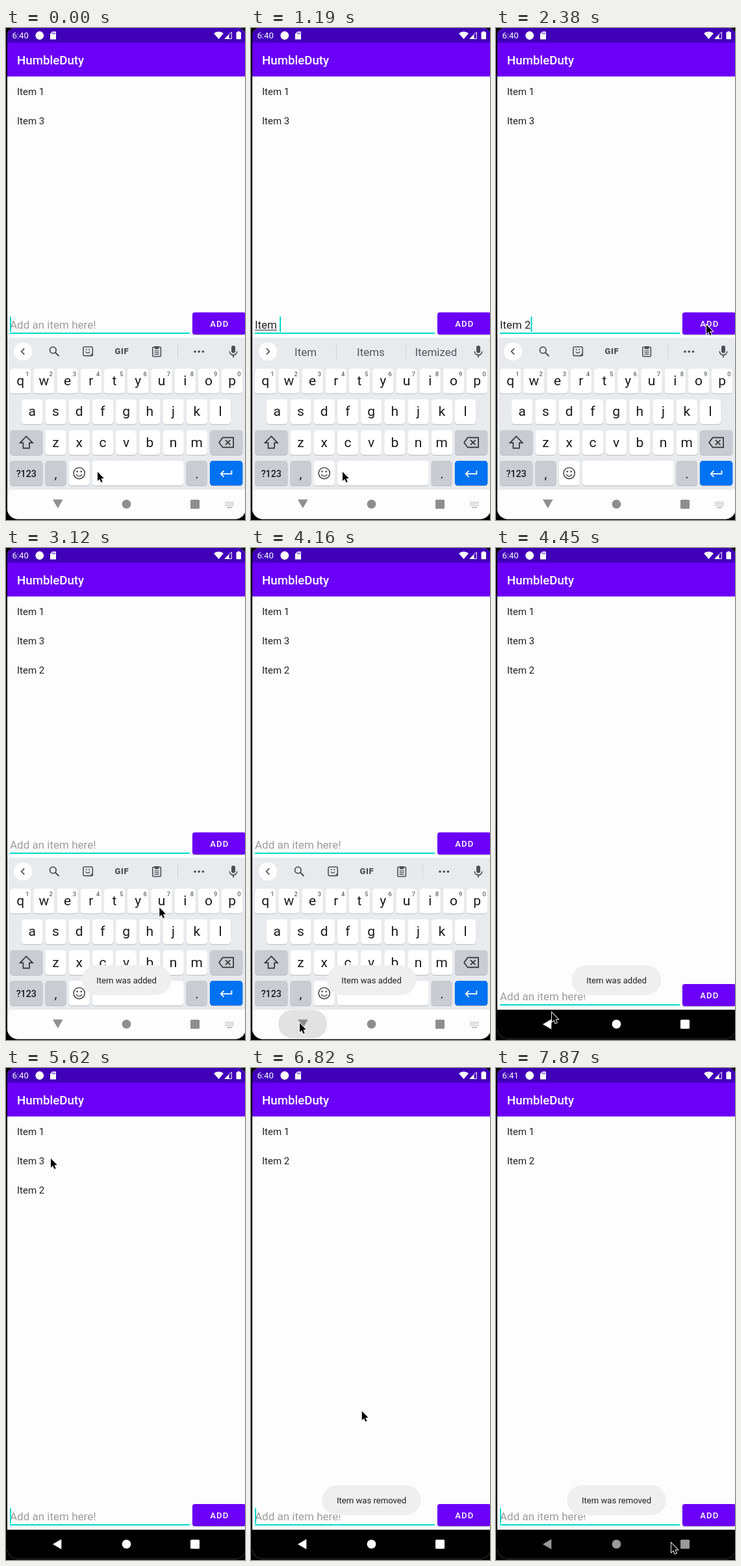
Write an HTML page with a canvas that moves like this. It is 368x756 px and loops after 8000 ms.

```html
<!DOCTYPE html>
<html lang="en">
<head>
<meta charset="utf-8">
<title>To-do list</title>
<style>
html, body { margin: 0; width: 100%; height: 100%; overflow: hidden; background: #000; }
canvas { display: block; width: 368px; height: 756px; }
</style>
</head>
<body>
<canvas id="stage"></canvas>
<script>
const W = 368, H = 756, LOOP = 8000;
const BEATS = 54, BEAT = LOOP / BEATS; // the screen refreshes once per beat
const canvas = document.getElementById('stage');
const ctx = canvas.getContext('2d');
const dpr = window.devicePixelRatio || 1;
canvas.width = W * dpr;
canvas.height = H * dpr;

const PURPLE = '#6a00f8', STATUS = '#4000b8', TEAL = '#00dacb';
const INK = '#212121', ICON = '#4c4f54', GRAY_KEY = '#c9ccd3', DIVIDER = '#cfd1d5';
const KB_SHIFT = 233; // how far the input bar drops when the keyboard closes
const MID = 185.5;

// Beats at which the main things happen
const TYPED = 9, ADD = 18, BACK = 26, CLOSE = 29, REMOVE = 42, MINUTE = 49;

// Pointer moves: start beat, end beat, where it arrives
const MOVES = [[0, 0, 141, 682], [11, 14, 317, 417], [14, 16, 324, 456], [19, 24, 75, 730],
  [28, 30, 86, 714], [30, 35, 65, 83], [35, 38, 69, 139], [43, 48, 226, 738], [48, 51, 270, 730]];

const clamp = v => Math.min(1, Math.max(0, v));
const ease = k => k * k * (3 - 2 * k);

function pointerAt(beat) {
  let x = 0, y = 0;
  for (const [start, end, toX, toY] of MOVES) {
    if (beat < start) break;
    const k = end > start ? ease(clamp((beat - start) / (end - start))) : 1;
    x += (toX - x) * k;
    y += (toY - y) * k;
  }
  return [x, y];
}

const typedAt = beat => beat < ADD ? 'Item 2'.slice(0, Math.floor(beat * 2 / 3)) : '';

function caretOn(beat) {
  const since = beat < ADD ? TYPED : 17.35;
  return beat < since || Math.floor((beat - since) * BEAT / 500) % 2 === 0;
}

function rect(x, y, w, h, color) {
  ctx.fillStyle = color;
  ctx.fillRect(x, y, w, h);
}

function pill(x, y, w, h, r, color) {
  ctx.beginPath();
  ctx.roundRect(x, y, w, h, r);
  ctx.fillStyle = color;
  ctx.fill();
}

function frame(x, y, w, h, r, color, width) {
  ctx.beginPath();
  ctx.roundRect(x, y, w, h, r);
  stroke(color, width);
}

function disc(x, y, r, color) {
  ctx.beginPath();
  ctx.arc(x, y, r, 0, 7);
  ctx.fillStyle = color;
  ctx.fill();
}

function arc(x, y, r, from, to, width) {
  ctx.beginPath();
  ctx.arc(x, y, r, from, to);
  stroke(ICON, width);
}

function stroke(color, width) {
  ctx.strokeStyle = color;
  ctx.lineWidth = width;
  ctx.stroke();
}

// Flat list of x, y pairs
function trace(pts, closed) {
  ctx.beginPath();
  for (let i = 0; i < pts.length; i += 2) ctx.lineTo(pts[i], pts[i + 1]);
  if (closed) ctx.closePath();
}

function poly(pts, color) {
  trace(pts, true);
  ctx.fillStyle = color;
  ctx.fill();
}

function line(pts, color, width, closed) {
  trace(pts, closed);
  stroke(color, width);
}

// Points left for positive w, right for negative
function chevron(x, y, w, h, color) {
  line([x + w, y - h, x, y, x + w, y + h], color, 1.7);
}

function smile(x, y, r) {
  for (const side of [-1, 1]) disc(x + side * r * 0.65, y - r * 0.55, r * 0.3, ICON);
  arc(x, y, r, 0.4, Math.PI - 0.4, 1.5);
}

function text(s, x, y, size, color, { weight = 400, align = 'left', gap = 0 } = {}) {
  ctx.font = `${weight} ${size}px Roboto, sans-serif`;
  ctx.letterSpacing = gap + 'px';
  ctx.textAlign = align;
  ctx.fillStyle = color;
  ctx.fillText(s, x, y);
  const width = ctx.measureText(s).width;
  ctx.letterSpacing = '0px';
  return width;
}

function drawHeader(beat) {
  rect(0, 0, W, 23, STATUS);
  rect(0, 22.5, W, 52, PURPLE);
  text(beat < MINUTE ? '6:40' : '6:41', 9.5, 16.3, 13.1, '#fff');
  disc(51.8, 11.5, 6.4, '#fff');

  // memory card
  poly([68, 9, 71.5, 5.5, 77, 5.5, 77, 17.5, 68, 17.5], '#fff');
  for (let i = 0; i < 3; i++) rect(71.2 + 1.8 * i, 7, 0.9, 2.5, STATUS);

  // wifi, signal, battery
  ctx.beginPath();
  ctx.moveTo(327.5, 17);
  ctx.arc(327.5, 17, 11.6, -Math.PI / 2 - 0.7, -Math.PI / 2 + 0.7);
  ctx.fillStyle = '#fff';
  ctx.fill();
  line([337, 16.5, 347.3, 16.5, 347.3, 6.2], '#fff', 1, true);
  poly([337, 16.5, 343.5, 16.5, 343.5, 10], '#fff');
  pill(354.5, 6.3, 7.5, 11, 1, '#fff');
  rect(356.7, 5, 3, 2, '#fff');

  text('HumbleDuty', 17, 56, 18.7, '#fff', { weight: 500 });
}

function drawInput(beat, y) {
  const typed = typedAt(beat);
  const base = y + 461.7;
  let caretX = 6;
  if (typed) {
    caretX += text(typed, 6, base, 16.9, INK);
    if (beat < TYPED) rect(6, base + 2, ctx.measureText(typed.trim()).width, 1, INK);
  } else {
    text('Add an item here!', 6, base, 17, '#9c9c9c');
  }
  rect(6, y + 468, 277, 2, TEAL);
  if (caretOn(beat)) rect(caretX, y + 443.5, 2, 23.5, TEAL);

  ctx.save();
  ctx.shadowColor = 'rgba(0,0,0,.25)';
  ctx.shadowBlur = 2 * dpr;
  ctx.shadowOffsetY = dpr;
  pill(287, y + 437, 82, 34, 3.7, PURPLE);
  ctx.restore();
  const glow = 0.2 * clamp(1 - Math.abs(beat - ADD + 0.4));
  pill(287, y + 437, 82, 34, 3.7, `rgba(255,255,255,${glow})`);
  text('ADD', 328.8, y + 459.2, 13.1, '#fff', { weight: 500, align: 'center', gap: 1.17 });
}

function drawTools() {
  const y = 497;
  arc(72.3, y - 2, 4.8, 0, 7, 1.8);
  line([75.8, y + 1.5, 81.5, y + 7.2], ICON, 2);

  frame(119, y - 7, 14.3, 13.6, 2, ICON, 1.6);
  smile(126, y - 1, 3.4);
  poly([128.5, y + 7, 134, y + 7, 134, y + 1.5], ICON);

  text('GIF', 178.3, y + 4.4, 13, ICON, { weight: 900, align: 'center', gap: 0.6 });

  frame(225.8, y - 6.8, 12.6, 14.6, 1.5, ICON, 1.6);
  rect(228.8, y - 8, 6.6, 4.5, ICON);
  for (let i = 0; i < 3; i++) rect(228.6, y - 1.5 + 2.7 * i, 7, 1.3, ICON);

  rect(264, y - 10, 1, 20, DIVIDER);
  for (let i = 0; i < 3; i++) disc(291 + 6.2 * i, y + 0.3, 1.8, ICON);
}

function drawStrip(beat) {
  const open = beat >= 3 && beat <= TYPED;
  disc(26, 497, 14, '#fff');
  if (open) {
    chevron(28.4, 497, -4.6, 4.7, ICON);
    ['Item', 'Items', 'Itemized'].forEach((word, i) =>
      text(word, 84 + 100.4 * i, 503.7, 16.9, '#54575c', { align: 'center' }));
    for (const x of [131, 238]) rect(x, 486, 1, 22, DIVIDER);
  } else {
    chevron(23.6, 497, 4.6, 4.7, ICON);
    drawTools();
  }
  pill(347, 488, 6, 11.5, 3, ICON);
  arc(350, 496.8, 5.8, 0, Math.PI, 1.6);
  rect(349.1, 502.5, 1.8, 3.8, ICON);
}

const PITCH = 36.22, KEY_W = 32.3, WIDE_W = 50.5;
const col = i => 6 + PITCH * i;
const row = i => 523.5 + 47.2 * i;

// Draws a key and returns the middle of it
function key(c, r, w = KEY_W, color = '#fff') {
  pill(col(c), row(r) + 1, w, 38, 4.5, '#b9bcc1');
  pill(col(c), row(r), w, 38, 4.5, color);
  return [col(c) + w / 2, row(r) + 19];
}

function label(s, [x, y], dy, size, weight) {
  text(s, x, y + dy, size, '#1a1a1a', { weight, align: 'center' });
}

function drawKeyboard(beat, shift) {
  ctx.save();
  ctx.translate(0, shift);
  rect(0, 476, W, 234, '#e8eaed');
  drawStrip(beat);

  ['qwertyuiop', 'asdfghjkl', 'zxcvbnm'].forEach((letters, r) => {
    [...letters].forEach((letter, i) => {
      const mid = key(i + r * (r + 1) / 4, r);
      label(letter, mid, 6.7, 21);
      if (r === 0) {
        text((i + 1) % 10, mid[0] + 10.8, mid[1] - 8, 9.3, '#606368', { weight: 500, align: 'center' });
      }
    });
  });

  let [x, y] = key(0, 2, WIDE_W, GRAY_KEY);
  line([x - 4.8, y + 8.8, x - 4.8, y + 0.5, x - 9.7, y + 0.5, x, y - 9.5,
    x + 9.7, y + 0.5, x + 4.8, y + 0.5, x + 4.8, y + 8.8], '#333', 1.7, true);

  [x, y] = key(8.5, 2, WIDE_W, GRAY_KEY);
  line([x - 11, y, x - 5.5, y - 7.5, x + 11, y - 7.5, x + 11, y + 7.5, x - 5.5, y + 7.5], '#333', 1.7, true);
  for (const d of [-3.8, 3.8]) line([x - 1.2, y - d, x + 6.4, y + d], '#333', 1.7);

  label('?123', key(0, 3, WIDE_W, GRAY_KEY), 5.4, 14.2, 500);
  label(',', key(1.5, 3, KEY_W, GRAY_KEY), 8, 20);
  [x, y] = key(2.5, 3);
  arc(x, y, 8.6, 0, 7, 1.7);
  smile(x, y, 4.6);
  key(3.5, 3, KEY_W + 3 * PITCH);
  label('.', key(7.5, 3, KEY_W, GRAY_KEY), 8, 20);
  [x, y] = key(8.5, 3, WIDE_W, '#0072f2');
  line([x + 8.3, y - 4, x + 8.3, y + 1, x - 8, y + 1], '#fff', 1.8);
  chevron(x - 8.4, y + 1, 4.7, 4.7, '#fff');
  ctx.restore();
}

function drawNav(beat, keyboard) {
  const y = 731.7;
  rect(0, 709.5, W, 47, keyboard ? '#fdfdfd' : '#000');
  const color = keyboard ? '#8e8e8e' : beat < MINUTE + 1 ? '#fff' : '#999';
  if (keyboard) {
    const grow = clamp((beat - BACK + 1) / 3);
    pill(79.5 - 37.5 * grow, 710, 75 * grow, 43, 21, '#e2e2e2');
    poly([72, y - 7.2, 87.6, y - 7.2, 79.8, y + 6.3], color);
    for (let i = 0; i < 18; i++) rect(337.3 + 2.4 * (i % 6), 728 + 2.6 * Math.floor(i / 6), 1.4, 1.4, '#aaa');
    rect(340.5, 736, 7.5, 1.5, '#aaa');
  } else {
    poly([72, y, 85.3, y - 7.7, 85.3, y + 7.7], color);
  }
  disc(MID, y, 6.9, color);
  pill(284, y - 7, 14, 14, 1.5, color);
}

function drawToast(message, alpha) {
  ctx.save();
  ctx.globalAlpha = clamp(alpha);
  ctx.font = '400 13.1px Roboto, sans-serif';
  const w = ctx.measureText(message).width + 45;
  pill(MID - w / 2, 641, w, 46, 23, '#efefef');
  text(message, MID, 669, 13.1, INK, { align: 'center' });
  ctx.restore();
}

function drawPointer([x, y]) {
  ctx.save();
  ctx.translate(x, y);
  trace([0, 0, 0, 14, 3.2, 11.1, 5.4, 16.2, 7.7, 15.2, 5.5, 10.3, 9.8, 10], true);
  stroke('#fff', 1.8);
  ctx.fillStyle = '#000';
  ctx.fill();
  ctx.restore();
}

function draw(now) {
  const beat = Math.floor(now / BEAT + 0.08) % BEATS;
  const keyboard = beat < CLOSE;
  const items = beat < ADD ? [1, 3] : beat < REMOVE ? [1, 3, 2] : [1, 2];

  ctx.setTransform(dpr, 0, 0, dpr, 0, 0);
  rect(0, 0, W, H, '#000');
  ctx.save();
  ctx.beginPath();
  ctx.roundRect(2, 0, 367, H - 1.5, [12, 12, 16, 16]);
  ctx.clip();
  rect(0, 0, W, H, '#fdfdfd');
  drawHeader(beat);
  items.forEach((n, i) => text('Item ' + n, 17, 103.2 + 44.9 * i, 15, INK));
  drawInput(beat, keyboard ? 0 : KB_SHIFT);
  if (beat <= CLOSE) drawKeyboard(beat, keyboard ? 0 : 130);
  drawNav(beat, keyboard);
  drawToast('Item was added', Math.min(beat - ADD, 35 - beat) / 2);
  drawToast('Item was removed', (beat - REMOVE) / 2);
  ctx.restore();
  drawPointer(pointerAt(beat));
}

function tick() {
  draw(performance.now());
  requestAnimationFrame(tick);
}
tick();
</script>
</body>
</html>
```
